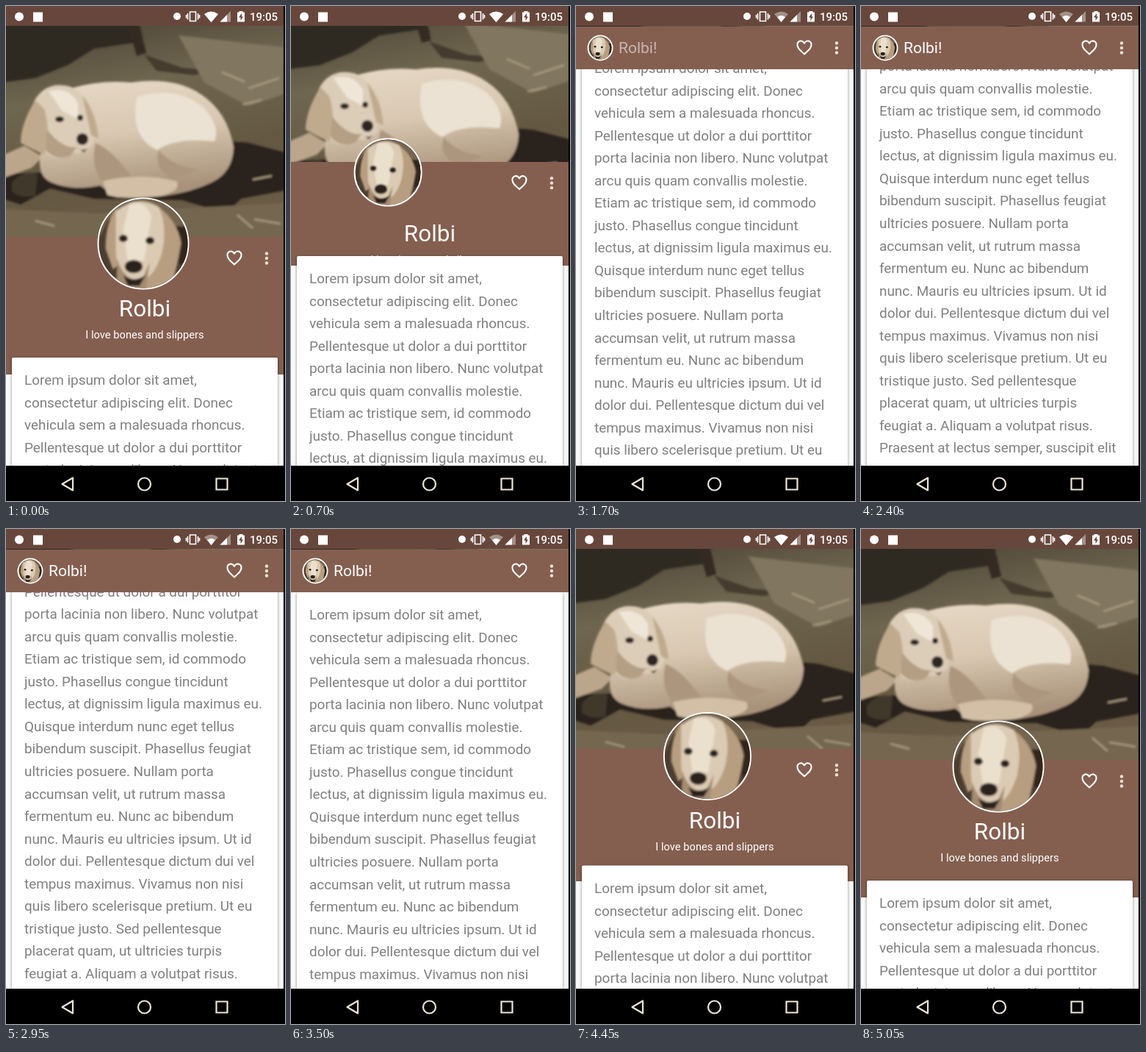
An HTML page that plays this animation: 380 px wide and 673 px high, repeating every 5.1 s.

```html
<!DOCTYPE html>
<html lang="en">
<head>
<meta charset="utf-8">
<title>Collapsing profile header</title>
<style>
@property --p { syntax: "<number>"; inherits: true; initial-value: 0; }

html, body { margin: 0; width: 100%; height: 100%; overflow: hidden; background: #000; }
body { font-family: Roboto, "Open Sans", sans-serif; }
div, svg { position: absolute; }
svg { overflow: visible; }

/* --p: total scroll, --o: header offset, --s: scroll after the header collapsed */
.screen {
  left: 0; top: 0; width: 378px; height: 673px; overflow: hidden; background: #fafafa;
  --o: min(var(--p), 415);
  --s: max(0, var(--p) - 415);
  --k: calc(var(--o) / 415);
  --lift: calc(var(--o) * -.69px);
  animation: scroll 5.1s infinite;
}
@keyframes scroll {
  0%     { --p: 0; }
  6%     { --p: 0; animation-timing-function: cubic-bezier(.4, 0, .8, .8); }
  13.73% { --p: 148; animation-timing-function: ease-out; }
  23%    { --p: 262; animation-timing-function: linear; }
  28%    { --p: 280; animation-timing-function: cubic-bezier(.4, 0, .8, .8); }
  31.2%  { --p: 373; animation-timing-function: linear; }
  33.33% { --p: 446; animation-timing-function: cubic-bezier(.2, .5, .4, 1); }
  47.06% { --p: 572; }
  54%    { --p: 572; animation-timing-function: ease-in-out; }
  66%    { --p: 415; }
  69%    { --p: 415; animation-timing-function: cubic-bezier(.4, 0, .8, .8); }
  79.41% { --p: 178; animation-timing-function: cubic-bezier(.2, .4, .5, 1); }
  92%, 100% { --p: 0; }
}

.photo { top: 27px; width: 378px; height: calc(287px - var(--o) * .69px); overflow: hidden; background: #5f5643; }
.photo svg { transform: translateY(calc(var(--o) * -.12px)); }
.band {
  top: calc(314px + var(--lift)); width: 378px;
  height: calc(187px - var(--o) * .31px); background: #845f50;
}
.details { width: 378px; height: 0; transform: translateY(var(--lift)); color: #fff; text-align: center; animation: details 5.1s linear infinite; }
.details div { width: 100%; }
.name { top: 392px; font-size: 31.5px; line-height: 40px; }
.motto { top: 437px; font-size: 14.7px; line-height: 20px; }
@keyframes details {
  0%, 13.6% { opacity: 1; }
  17.5%, 82% { opacity: 0; }
  86%, 100% { opacity: 1; }
}

.view { top: 86px; width: 378px; height: 539px; overflow: hidden; }
.card {
  left: 8px; top: 0; width: 362px; height: 900px; border-radius: 2px;
  background: #fff; box-shadow: 0 1px 4px rgba(0, 0, 0, .42);
  transform: translateY(calc((415 - var(--o) - max(0, 23 - var(--o) * .0697) - var(--s)) * 1px));
}
.text { left: 17px; top: 16px; font-size: 18.9px; line-height: 30.55px; color: #808080; white-space: pre; }

.actions { top: 0; width: 378px; height: 0; transform: translateY(max(57px, 343px + var(--lift))); }
.bar-title { left: 58px; top: 42px; font-size: 21px; line-height: 30px; color: #fff; animation: bar-title 5.1s linear infinite; }
@keyframes bar-title {
  0%, 31.2% { opacity: 0; }
  35.1%, 73.5% { opacity: 1; }
  77.4%, 100% { opacity: 0; }
}

.avatar {
  --r: calc(62.5px - var(--k) * 45px);
  left: calc(187px - var(--k) * 154px); top: max(57px, 323px - var(--o) * .655px);
  width: calc(var(--r) * 2); height: calc(var(--r) * 2);
  box-sizing: border-box; border: 2px solid #fff; border-radius: 50%;
  overflow: hidden; background: #4b3d30; transform: translate(-50%, -50%);
}
.avatar svg { left: 0; top: 0; width: 100%; height: 100%; }

.status { top: 0; width: 378px; height: 27px; background: #67473c; }
.clock { left: 332px; top: 5px; font-size: 15px; font-weight: 500; line-height: 20px; color: #fff; }
.strong { animation: wifi 5.1s step-end infinite; }
@keyframes wifi {
  0% { opacity: 1; }
  27.5% { opacity: 0; }
  74.5% { opacity: 1; }
}
.nav { top: 625px; width: 378px; height: 48px; background: #000; }
</style>
</head>
<body>
<div class="screen">
  <div class="photo">
    <svg width="378" height="287" viewBox="0 27 378 287">
      <defs>
        <linearGradient id="ground" x2=".25" y2="1">
          <stop offset="0" stop-color="#494234"/><stop offset=".35" stop-color="#6f664f"/>
          <stop offset=".7" stop-color="#645842"/><stop offset="1" stop-color="#6b5b46"/>
        </linearGradient>
        <linearGradient id="coat" x2=".2" y2="1">
          <stop offset="0" stop-color="#e6d9c6"/><stop offset=".5" stop-color="#d9c8b2"/><stop offset="1" stop-color="#a8927a"/>
        </linearGradient>
        <filter id="soft"><feGaussianBlur stdDeviation="1.6"/></filter>
      </defs>
      <path fill="url(#ground)" d="M0 27H378V330H0Z"/>
      <g filter="url(#soft)">
        <path fill="#2e2921" d="M-5 20H165L175 50 120 58 85 80 40 98-5 104Z"/>
        <path fill="#342c23" d="M164 20H181L191 64 178 68Z"/>
        <path fill="#443b2e" d="M188 66 240 84 290 88 255 94 205 88Z"/>
        <path fill="#81765f" d="M235 40 378 56V120L330 136 270 104Z"/>
        <path fill="#2a231c" d="M283 182 330 186 384 200V250L320 262 300 282 240 264 120 262 60 248 20 270-5 262V228L60 226Z"/>
        <path fill="#756650" d="M-5 276 120 282 220 276 378 268V330H-5Z"/>
        <g fill="none" stroke="#a79a80" stroke-width="2.5">
          <path d="M294 90 325 103M330 112 372 98M348 128 322 134M315 284 336 302M338 290 374 296M40 292 66 299M336 236 362 231"/>
        </g>
        <path fill="#bca68b" d="M-5 203 25 190 50 205 35 220-5 234Z"/>
        <path fill="#41372b" d="M8 240Q22 222 43 228L40 258Q18 262 8 252Z"/>
        <path fill="url(#coat)" d="M88 112Q130 100 170 104 230 95 267 121 302 145 310 192 309 226 280 240 230 264 150 260L128 244Q90 252 62 240 40 230 48 196Z"/>
        <path fill="#ebe2d3" d="M178 124Q232 107 270 139 292 164 284 184 230 178 206 196 168 178 178 124Z"/>
        <path fill="#ac967d" d="M122 186Q148 198 172 234L132 240Q114 218 122 186M208 196Q226 218 262 222L230 236Q200 224 208 196Z"/>
        <path fill="#d2bfa6" d="M132 238Q180 226 232 238 240 250 212 258 166 264 138 257Z"/>
        <path fill="#dccdb8" d="M38 130Q52 104 80 108 106 111 114 144 121 165 118 188 108 202 92 199 66 216 52 196 30 170 38 130Z"/>
        <path fill="#c0aa8d" d="M40 128Q20 160 20 186 36 195 52 202 62 170 52 140M104 122Q123 144 126 180L116 176Z"/>
        <path fill="#efe6d8" d="M58 116Q84 108 98 132L98 154 76 142Z"/>
        <path fill="#b49e84" d="M56 168Q76 194 96 192L88 203Q68 212 54 196Z"/>
        <g fill="#2d2520">
          <ellipse cx="73" cy="154" rx="6" ry="4"/><ellipse cx="101" cy="152" rx="4" ry="4"/>
          <ellipse cx="104" cy="181" rx="8" ry="8"/><path d="M95 191Q104 200 112 192L106 199Z"/>
        </g>
      </g>
    </svg>
  </div>
  <div class="band"></div>
  <div class="details">
    <div class="name">Rolbi</div>
    <div class="motto">I love bones and slippers</div>
  </div>

  <div class="view">
    <div class="card"><div class="text">Lorem ipsum dolor sit amet,
consectetur adipiscing elit. Donec
vehicula sem a malesuada rhoncus.
Pellentesque ut dolor a dui porttitor
porta lacinia non libero. Nunc volutpat
arcu quis quam convallis molestie.
Etiam ac tristique sem, id commodo
justo. Phasellus congue tincidunt
lectus, at dignissim ligula maximus eu.
Quisque interdum nunc eget tellus
bibendum suscipit. Phasellus feugiat
ultricies posuere. Nullam porta
accumsan velit, ut rutrum massa
fermentum eu. Nunc ac bibendum
nunc. Mauris eu ultricies ipsum. Ut id
dolor dui. Pellentesque dictum dui vel
tempus maximus. Vivamus non nisi
quis libero scelerisque pretium. Ut eu
tristique justo. Sed pellentesque
placerat quam, ut ultricies turpis
feugiat a. Aliquam a volutpat risus.
Praesent at lectus semper, suscipit elit
vitae, tempor nunc.</div></div>
  </div>

  <div class="actions">
    <svg width="378" height="1">
      <path transform="translate(298.4 -12.6) scale(1.05)" fill="none" stroke="#fff" stroke-width="2"
        d="M12 20C6 14.7 3 12 3 8.5A4.5 4.5 0 0 1 12 6.6 4.5 4.5 0 0 1 21 8.5C21 12 18 14.7 12 20Z"/>
      <g fill="#eee0d2"><circle cx="355" cy="-6.5" r="2.2"/><circle cx="355" r="2.2"/><circle cx="355" cy="6.5" r="2.2"/></g>
    </svg>
  </div>
  <div class="bar-title">Rolbi!</div>

  <div class="avatar">
    <svg viewBox="127 263 120 120">
      <g filter="url(#soft)">
        <path fill="#75654f" d="M120 260H250V300H230L140 290 120 330Z"/>
        <path fill="#30271f" d="M222 300H250V350H215Z"/>
        <path fill="#b79e80" d="M152 275Q136 292 136 330L146 358 168 340M205 272Q232 290 238 322 232 360 222 390H180Z"/>
        <path fill="#dccbb4" d="M150 280Q178 256 208 274 220 300 212 336 200 375 176 376 154 372 150 336Z"/>
        <path fill="#ebe0ce" d="M168 270Q190 264 198 286L188 346H166L160 304Z"/>
        <path fill="#a48b71" d="M152 344Q160 372 184 374L196 348 190 386H150Z"/>
        <g fill="#2c231d">
          <ellipse cx="160" cy="316" rx="6" ry="5"/><ellipse cx="196" cy="319" rx="6" ry="5"/>
          <ellipse cx="174" cy="354" rx="12" ry="9"/><path d="M160 366Q174 376 190 366L182 380H166Z"/>
        </g>
      </g>
    </svg>
  </div>

  <div class="status">
    <svg width="378" height="27" fill="#fff">
      <circle cx="18" cy="14.5" r="6"/>
      <path d="M37 8.500H50V21.500H37Z"/>
      <circle cx="233" cy="14" r="5"/>
      <path fill="none" stroke="#fff" stroke-width="1.600" d="M250.500 8H258.500V20.500H250.500ZM247.500 10V18.500M261.500 10V18.500M245.500 12V16.500M263.500 12V16.500"/>
      <path opacity=".4" d="M270 11Q279.500 4 289 11L279.500 22Z"/>
      <path d="M274 15Q279.500 11 285 15L279.500 22Z"/>
      <path class="strong" d="M270 11Q279.500 4 289 11L279.500 22Z"/>
      <path opacity=".4" d="M306 7V21.500H291.500Z"/>
      <path d="M301 12V21.500H291.500Z"/>
      <path d="M317.500 7H322.500V8.500H325V21.500H315V8.500H317.500Z"/>
      <path fill="#67473c" d="M321 10 317 15.500H319.500V20L323 14.500H321Z"/>
    </svg>
    <div class="clock">19:05</div>
  </div>
  <div class="nav">
    <svg width="378" height="48" fill="none" stroke="#eee5da" stroke-width="2.200">
      <path d="M91 16.500V33.500L76.500 25Z" stroke-linejoin="round"/>
      <circle cx="188.500" cy="25" r="8.500"/>
      <path d="M286.500 17.500H301.500V32.500H286.500Z"/>
    </svg>
  </div>
</div>
</body>
</html>
```
